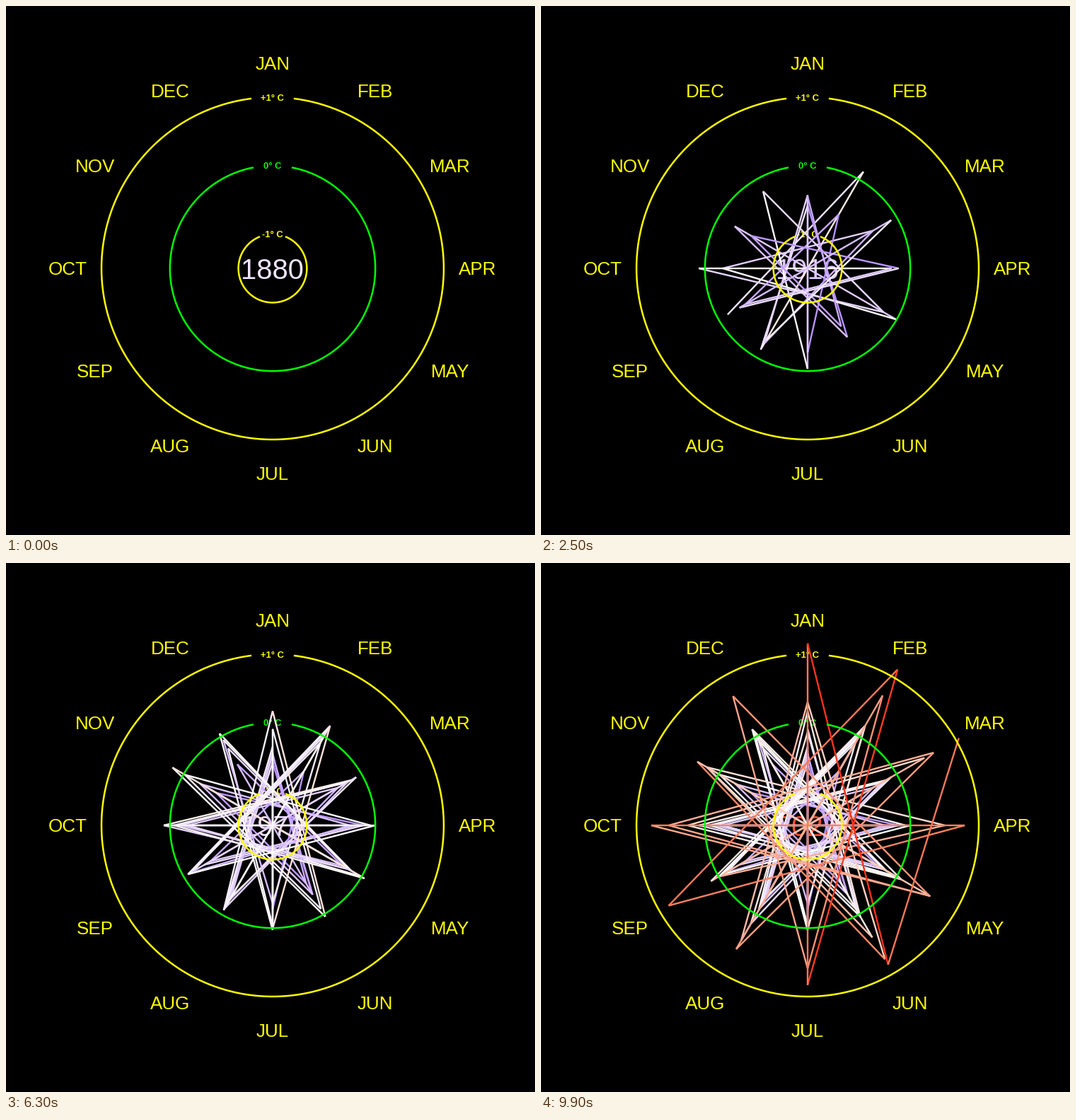
These frames come from a looping animation (748 px wide and 748 px high, 10 s). A matplotlib script:

```python
import numpy as np
import matplotlib.pyplot as plt
from matplotlib.animation import FuncAnimation
from matplotlib.collections import LineCollection

SIZE, DPI, FRAMES = 748, 100, 100
CX, CY = 377, 371
ZERO_R, DEG_R = 145.2, 96.8          # radius at 0 degrees, pixels per degree
STEP, LAST = 17.2321, 1706           # months per tick, last month on record
LIMIT = 1.25                         # anomaly shown in full colour
YELLOW, GREEN = "#ffff00", "#00ff00"
PX = 72 / DPI
MONTHS = "JAN FEB MAR APR MAY JUN JUL AUG SEP OCT NOV DEC".split()

ANOMALY = np.array([
    -.15, .13, -.13, -.58, -.34, -.27, -.01, -.26, -.40, -.23,
    -.43, -.03, -.20, -.22, .09, -.27, -.45, -.59, -.27, -.45,
    -.52, -.55, -.17, -.35, -.09, -.29, -.47, -.33, -.47, -.32,
    -.15, -.23, -.11, -.10, -.36, -.06, -.17, -.30, -.37, -.10,
    .02, -.07, .17, .04, .19, .05, -.06, -.24, -.10, -.35,
    .03, .05, -.21, -.25, .00, -.07, .18, .01, -.09, -.09,
    -.02, -.07, .09, -.18, .16, -.14, -.02, .12, .08, .25,
    .47, .13, .17, .02, .12, .39, .20, .505, .00, .00,
    .44, .30, .76, .36, .57, .53, .625, .587, .69, .59,
    .68, .55, .785, .795, .845, 1.13, .83, 1.16, .85, 1.05])

LAB = {"white": (100, 0, 0), "blue": (32.3, 79.19, -107.86), "red": (53.24, 80.09, 67.2)}
TO_RGB = np.array([[3.2406, -1.5372, -.4986],
                   [-.9689, 1.8758, .0415],
                   [.0557, -.2040, 1.0570]])


def lab_to_rgb(lab):
    fy = (lab[0] + 16) / 116
    f = np.array([fy + lab[1] / 500, fy, fy - lab[2] / 200])
    xyz = np.where(f > 6 / 29, f ** 3, (f - 4 / 29) * 108 / 841) * (.9505, 1, 1.089)
    lin = np.clip(TO_RGB @ xyz, 0, 1)
    return np.where(lin > .0031308, 1.055 * lin ** (1 / 2.4) - .055, 12.92 * lin)


def heat_color(value):
    end = np.array(LAB["red" if value > 0 else "blue"])
    white = np.array(LAB["white"])
    return lab_to_rgb(white + (end - white) * min(abs(value) / LIMIT, 1))


def polar(radius, angle):
    return np.column_stack([CX + radius * np.sin(angle), CY - radius * np.cos(angle)])


month = np.minimum(np.floor(STEP * (np.arange(FRAMES) + .5)), LAST).astype(int)
points = polar(ZERO_R + DEG_R * ANOMALY, month % 12 * np.pi / 6)
segments = np.stack([points[:-1], points[1:]], axis=1)
colors = np.array([heat_color(v) for v in ANOMALY])

fig = plt.figure(figsize=(SIZE / DPI, SIZE / DPI), dpi=DPI, facecolor="black")
ax = fig.add_axes([0, 0, 1, 1])
ax.set(xlim=(0, SIZE), ylim=(SIZE, 0))
ax.axis("off")


def label(x, y, text, size, color, weight="normal"):
    return ax.text(x, y + .35 * size, text, fontsize=size * PX, color=color,
                   weight=weight, family="Liberation Sans",
                   ha="center", va="baseline", zorder=1)


def ring(degrees, gap, color, text):
    radius = ZERO_R + DEG_R * degrees
    angle = np.radians(np.linspace(gap, 360 - gap, 400))
    ax.plot(*polar(radius, angle).T, color=color, lw=2.5 * PX,
            solid_capstyle="butt", zorder=3)
    label(CX, CY - radius, text, 13, color, "bold")


ring(1, 7.1, YELLOW, "+1° C")
ring(0, 10.7, GREEN, "0° C")
ring(-1, 21.8, YELLOW, "-1° C")
for (x, y), name in zip(polar(290, np.arange(12) * np.pi / 6), MONTHS):
    label(x, y, name, 26, YELLOW)

year = label(CX, CY + .5, "1880", 40, "white")
trail = LineCollection([], linewidths=2.4 * PX, capstyle="butt", zorder=2)
ax.add_collection(trail)


def update(i):
    trail.set_segments(segments[:i])
    trail.set_color(colors[:i])
    year.set_text(str(1880 + month[i] // 12))
    year.set_color(colors[i])
    return trail, year


anim = FuncAnimation(fig, update, frames=FRAMES, interval=100,
                     repeat=True, repeat_delay=0)
plt.show()
```
